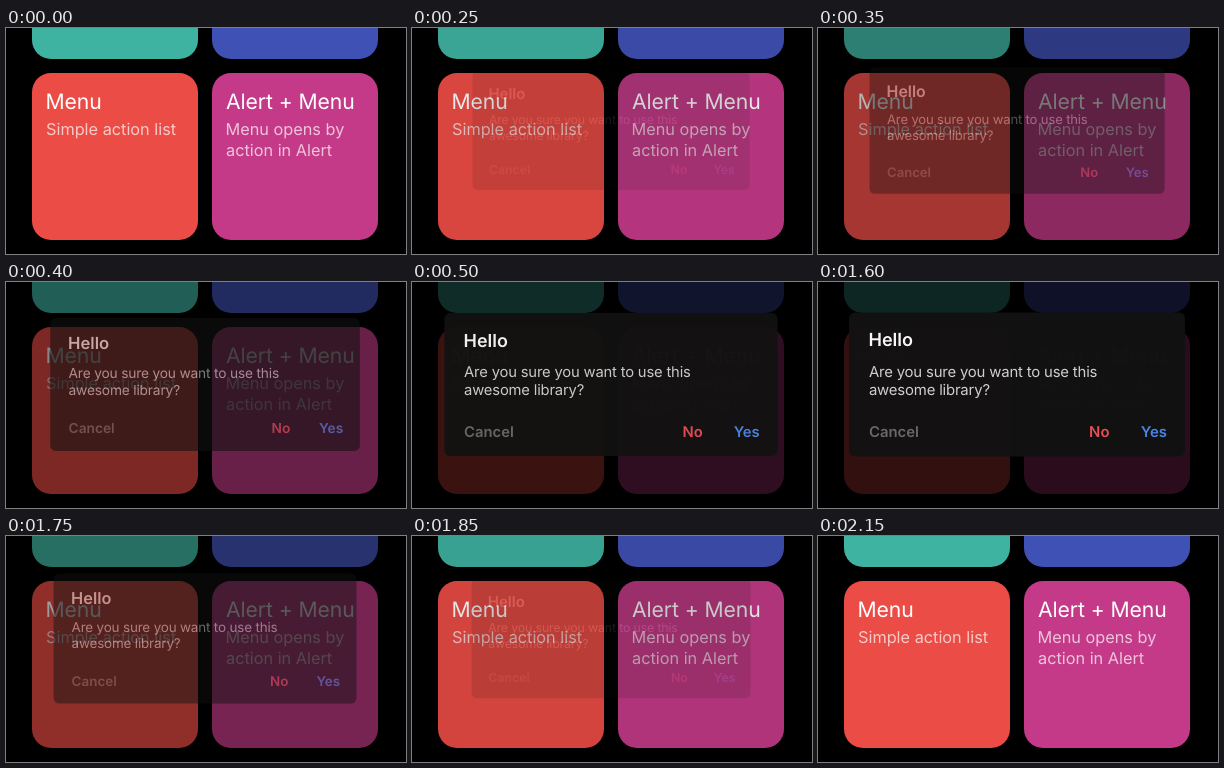
These frames come from a looping animation (400x226 px, 2200 ms). An HTML page:

```html
<!DOCTYPE html>
<html lang="en">
<head>
<meta charset="utf-8">
<title>Alert</title>
<style>
  html, body { margin: 0; width: 100%; height: 100%; overflow: hidden; background: #000; }
  svg { display: block; width: 100vw; height: 100vh; font-family: Inter, Roboto, sans-serif; text-rendering: geometricPrecision; }
  .title { font-size: 21.2px; letter-spacing: -.1px; fill: #fff; }
  .note { font-size: 16.3px; fill: #fff; fill-opacity: .7; }
  .head { font-size: 18.2px; font-weight: 600; fill: #fff; }
  .body { font-size: 15px; letter-spacing: -.19px; fill: #d6d6d6; }
  .button { font-size: 15px; font-weight: 600; }
</style>
</head>
<body>
<svg viewBox="0 0 400 226">
  <rect width="400" height="226"/>
  <g>
    <rect x="26" y="-136" width="166" height="167" rx="19" fill="#3fb3a2"/>
    <rect x="206" y="-136" width="166" height="167" rx="19" fill="#4051b5"/>
    <rect x="26" y="45" width="166" height="167" rx="19" fill="#eb4c45"/>
    <rect x="206" y="45" width="166" height="167" rx="19" fill="#c43a88"/>
    <text class="title" x="39.500" y="81">Menu</text>
    <text class="note" x="40" y="107">Simple action list</text>
    <text class="title" x="220" y="81">Alert + Menu</text>
    <text class="note" x="219.500" y="107">Menu opens by</text>
    <text class="note" x="220" y="128">action in Alert</text>
  </g>
  <rect id="shade" width="400" height="226" opacity="0"/>
  <g id="alert" opacity="0">
    <rect x="30" y="30" width="338" height="145" rx="6" fill="#121212"/>
    <text class="head" x="49.500" y="64">Hello</text>
    <text class="body" x="50" y="95">Are you sure you want to use this</text>
    <text class="body" x="50" y="113.500">awesome library?</text>
    <text class="button" x="50" y="155.500" fill="#6c6c6c">Cancel</text>
    <text class="button" x="271.500" y="155.500" fill="#ed5056">No</text>
    <text class="button" x="323.500" y="155.500" fill="#4b8aea">Yes</text>
  </g>
</svg>
<script>
  const LOOP = 2200, STEP = 50, OPEN_AT = 100, CLOSE_AT = 1600;
  // How far the alert is open, one value per step
  const OPENING = [0, .015, .045, .1, .21, .365, .58, .79, .93, .98, .993, 1];
  const CLOSING = [.97, .88, .7, .48, .27, .125, .05, .015, 0];
  const shade = document.getElementById('shade');
  const alertBox = document.getElementById('alert');

  function pick(values, time) {
    const i = Math.floor(time / STEP);
    return values[Math.max(0, Math.min(i, values.length - 1))];
  }

  function draw(now) {
    const time = now % LOOP;
    const open = time < CLOSE_AT ? pick(OPENING, time - OPEN_AT) : pick(CLOSING, time - CLOSE_AT);
    const scale = .8 + .2 * open;
    shade.setAttribute('opacity', .81 * open);
    alertBox.setAttribute('opacity', open);
    alertBox.setAttribute('transform', `translate(199.5 102.5) scale(${scale}) translate(-199.5 -102.5)`);
  }

  const start = performance.now();
  function tick() {
    draw(performance.now() - start);
    requestAnimationFrame(tick);
  }
  tick();
</script>
</body>
</html>
```
